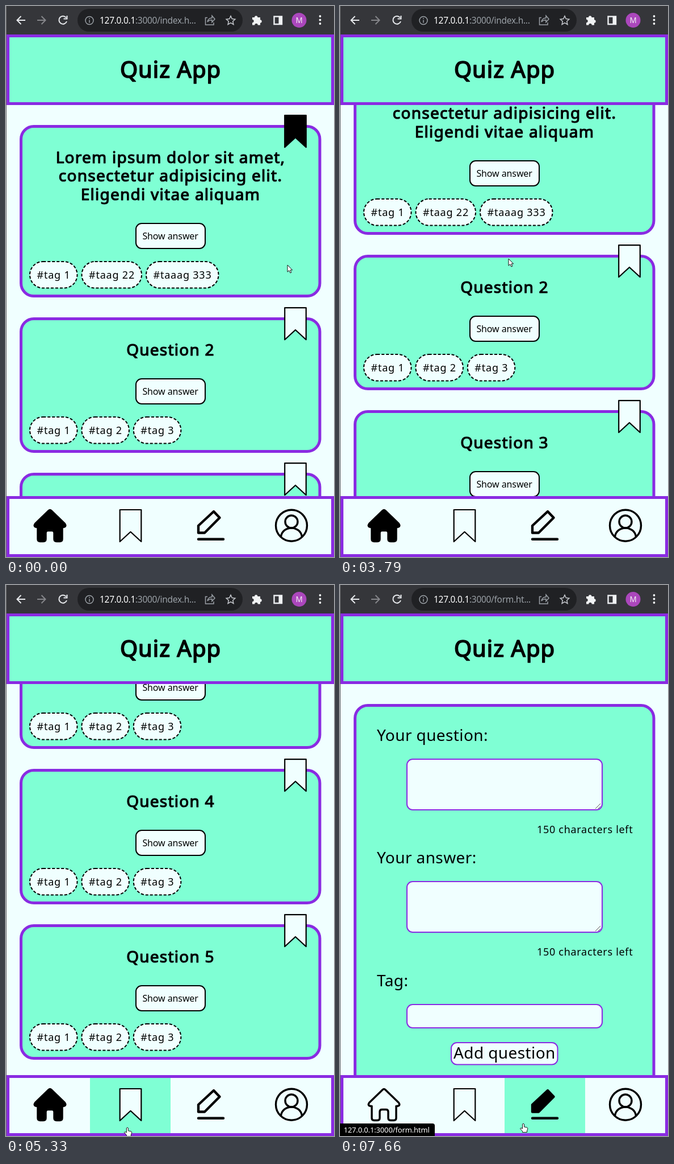
These frames come from a looping animation (578 by 968 pixels, 8000 ms). An HTML page:

```html
<!DOCTYPE html>
<html lang="en">
<head>
<meta charset="utf-8">
<title>Quiz App</title>
<style>
html, body { margin: 0; width: 100%; height: 100%; overflow: hidden; background: #f0ffff; }
svg { display: block; width: 578px; height: 968px; font-family: "Noto Sans", "Open Sans", sans-serif; }
text { white-space: pre; }
.box { fill: #7fffd4; stroke: #8a2be2; stroke-width: 5; }
.bar { fill: #f0ffff; }
.h1, .h2 { text-anchor: middle; stroke: #000; stroke-linejoin: round; }
.h1 { font-size: 40px; stroke-width: 1.7; }
.h2 { font-size: 28px; stroke-width: 1.2; }
.btn rect { fill: #f0ffff; stroke: #000; stroke-width: 2; }
.btn text { font-size: 16px; letter-spacing: -.1px; text-anchor: middle; }
.tag rect { fill: #f0ffff; stroke: #000; stroke-width: 2; stroke-dasharray: 5 3; }
.tag text { font-size: 18px; letter-spacing: .8px; }
.small { font-size: 18px; }
.label { font-size: 28px; letter-spacing: .4px; }
.field { fill: #f0ffff; stroke: #8a2be2; stroke-width: 2; }
.mark { fill: #f0ffff; stroke: #000; stroke-width: 2.2; stroke-linejoin: round; }
.mark.on, .icon.on .fillable { fill: #000; }
.icon { fill: none; stroke: #000; stroke-width: 3.4; stroke-linejoin: round; stroke-linecap: round; }
.pen { stroke-width: 4.4; }
.tool { fill: none; stroke: #e8eaed; stroke-width: 2; }
.url { font-size: 15.5px; letter-spacing: -.3px; fill: #9aa0a6; }
.status { font-size: 13px; letter-spacing: -.15px; fill: #fff; }
.ptr { fill: #fff; stroke: #111; stroke-width: 1; stroke-linejoin: round; }
</style>
</head>
<body>
<svg id="stage" viewBox="0 0 578 968"></svg>
<script>
const LOOP = 8000, PITCH = 273, ANSWER_H = 56.5;
const NAV_X = [6, 148, 290, 432, 573];
const $ = id => document.getElementById(id);

const rect = (x, y, w, h, r, cls = '') =>
  `<rect class="${cls}" x="${x}" y="${y}" width="${w}" height="${h}" rx="${r}"/>`;
const text = (x, y, s, cls, gap) =>
  `<text class="${cls}" x="${x}" y="${y}"${gap ? ` letter-spacing="${gap}"` : ''}>${s}</text>`;
const mark = (x, y, cls) =>
  `<path class="mark ${cls}" d="M${x} ${y}h37.6v56l-18.8-17.2l-18.8 17.2z"/>`;

function button(y, label, id = '') {
  const w = label === 'Hide answer' ? 118 : 124;
  return `<g class="btn" id="${id}">${rect(290 - w / 2 + 1, y + 1, w - 2, 44, 10)}${text(289.6, y + 29, label, '')}</g>`;
}

function tag(x, y, w, s) {
  return `<g class="tag">${rect(x + 1, y + 1, w - 2, 46.5, 23.2)}${text(x + 13.5, y + 30.5, s, '')}</g>`;
}

// A quiz card; everything below the heading is laid out from its line count.
function card(top, lines, tags, { saved = '', answer = '', id = '' } = {}) {
  const extra = (lines.length - 1) * 32.5;
  const btnY = top + 107 + extra;
  const tagY = btnY + 67 + (answer ? ANSWER_H : 0);
  return rect(26.5, top + 2.5, 526.5, tagY + 59 - top, 22.5, 'box')
    + mark(491.2, top - 16.8, saved)
    + lines.map((s, i) => text(290, top + 66.5 + i * 32.5, s, 'h2', 1.25)).join('')
    + button(btnY, answer ? 'Hide answer' : 'Show answer', id)
    + (answer && text(245, btnY + 98, answer, 'small', .4))
    + tags.map(([x, w, s]) => tag(x, tagY, w, s)).join('');
}

const lorem = ['Lorem ipsum dolor sit amet,', 'consectetur adipisicing elit.', 'Eligendi vitae aliquam'];
const loremTags = [[41, 85.5, '#tag 1'], [132.5, 107.5, '#taag 22'], [246, 129.5, '#taaag 333']];
const plainTags = [1, 2, 3].map((n, i) => [41 + i * 91.4, 85.5, '#tag ' + n]);
const first = opts => card(209, lorem, loremTags, { saved: 'on', ...opts });
const rest = [2, 3, 4, 5].map((n, i) => card(547 + i * PITCH, ['Question ' + n], plainTags)).join('');

function area(y) {
  return rect(118, y + 1, 344, 89, 10, 'field')
    + `<path d="M450 ${y + 88}l9-9M455 ${y + 88}l4-4" stroke="#555"/>`
    + text(347, y + 131, '150 characters left', 'small', .7);
}
const form = rect(26.5, 211.5, 526.5, 800, 22.5, 'box')
  + text(65, 274, 'Your question:', 'label') + area(305)
  + text(65, 489, 'Your answer:', 'label') + area(520)
  + text(65, 705, 'Tag:', 'label') + rect(118, 737, 344, 41, 10, 'field')
  + rect(196, 804, 187.5, 38.5, 10, 'field') + text(200, 832, 'Add question', 'label');

const toolbar = `<rect width="578" height="50" fill="#35363a"/>
  <rect x="126" y="5" width="291" height="40" rx="20" fill="#202124"/>
  <g class="tool">
    <path d="M34 25H20M26.5 18l-7 7 7 7"/>
    <path d="M55 25H69M62.5 18l7 7-7 7" stroke="#85868a"/>
    <path d="M106 20.5a7 7 0 1 0 1 6.5M107.5 17v5.5h-6"/>
    <g stroke="#9aa0a6" stroke-width="1.5">
      <circle cx="147" cy="25.5" r="7"/><path d="M147 24.5v5M147 21v1.8"/>
      <path d="M355 20.5h-3.5v12.5h14.5v-4M355 28c1-5 4-7 8-7v-4l5 6-5 5.5v-4c-4 0-6 1-8 3.5z"/>
    </g>
    <path d="M396 17.5l2.3 5.1 5.5.6-4.1 3.7 1.2 5.5-4.9-2.8-4.9 2.8 1.2-5.5-4.1-3.7 5.5-.6z" stroke="#c4c7cc" stroke-width="1.5"/>
    <rect x="472.5" y="18.5" width="13.5" height="13.5" stroke-width="2.5"/>
  </g>
  <g fill="#f1f3f4">
    <path d="M434 20h4a2.7 2.7 0 1 1 5.4 0h4.6v4.3a2.7 2.7 0 1 1 0 5.4v3.8h-4.3a2.7 2.7 0 0 0-5.4 0h-4.3v-4.3a2.7 2.7 0 0 0 0-5.4z"/>
    <rect x="480.5" y="18" width="6" height="14"/>
    ${[18, 24.5, 31].map(y => `<circle cx="553.5" cy="${y}" r="1.9"/>`).join('')}
    <circle cx="516.5" cy="25" r="13" fill="#ab47bc"/>
    <text x="516.5" y="30" font-size="13.5" text-anchor="middle">M</text>
  </g>
  <text class="url" x="165" y="31"><tspan fill="#fff">127.0.0.1</tspan><tspan id="path"></tspan></text>`;

const nav = `<rect x="1" y="861" width="577" height="107" fill="#8a2be2"/>
  ${rect(6, 866, 567, 97, 0, 'bar')}
  <rect id="cell" y="866" width="142" height="97" fill="#7fffd4"/>
  <g class="icon" id="nav0"><path class="fillable" d="M75.3 886.5Q77.5 884.5 79.7 886.5L103.5 909.5Q107 914.5 101 915.5H99V936.5Q99 940.5 95 940.5H89Q85 940.5 85 936.5V925.5Q85 921.5 81 921.5H74Q70 921.5 70 925.5V936.5Q70 940.5 66 940.5H60Q56 940.5 56 936.5V915.5H54Q48 914.5 51.5 909.5Z"/></g>
  <g id="nav1">${mark(200.7, 885, '')}</g>
  <g class="icon pen" id="nav2"><path class="fillable" d="M339 913L366 888L376.5 899L350 925.5H339Z"/><path d="M339 936.7H383"/></g>
  <g class="icon"><circle cx="503" cy="912.7" r="27.5"/><circle cx="503" cy="906" r="11"/><path d="M484.5 932.5C487 912 519 912 521.5 932.5"/></g>`;

$('stage').innerHTML = `<rect width="578" height="968" fill="#f0ffff"/>
  <g id="home"><g id="shut">${first({ id: 'show' })}</g><g id="open">${first({ answer: 'ANSWER 1', id: 'hide' })}</g><g id="rest">${rest}</g></g>
  <g id="saved">${first()}</g>
  <g id="form">${form}</g>
  ${rect(3.5, 52.5, 572, 119, 0, 'box')}
  <text class="h1" id="title" x="290" y="126"></text>
  ${toolbar}${nav}
  <rect width="1" height="968" fill="#6b6c6f"/>
  <g id="status"><path id="bar"/><text class="status" id="link" x="6.5" y="961.5"></text></g>
  <g id="ptr"><path class="ptr" id="arrow" d="M0 0V12.2L2.8 9.6L4.9 14L6.9 13.1L4.9 8.9H8.6Z"/>
  <path class="ptr" id="hand" d="M-1.5 9V1.2Q0-.8 1.5 1.2V6L6.3 7Q8 7.5 7.8 9.5L6.5 13V15.5H-1.5V13.5L-5.5 9Q-4.5 7-3 8.3Z"/></g>`;

const pages = {
  home: { title: 'Quiz App', gap: 1, path: ':3000/index.h...', icon: 0 },
  saved: { title: 'Bookmarks', gap: .2, path: ':3000/bookm...', icon: 1 },
  form: { title: 'Quiz App', gap: 1, path: ':3000/form.ht...', icon: 2 }
};
const links = { 1: ['bookmark.h...', 190], 2: ['form.html', 167] };

// Pointer moves: start, end, step count, then start, bend and end of the path.
const moves = [
  [1360, 2040, 9, [496, 455], [400, 176], [288, 392]],
  [3440, 3440, 1, [288, 392], [292, 420], [297, 444]],
  [4840, 5140, 5, [297, 444], [270, 700], [222, 964]],
  [5330, 5580, 4, [222, 964], [210, 950], [205, 933]],
  [6690, 7100, 7, [205, 933], [264, 930], [323, 946]]
];
const scrolls = [[0, 0], [3790, 110], [3850, 260], [3920, 410], [3980, 540], [4050, 634],
  [4110, 652], [4180, 660], [4470, 701], [4540, 770]];

function pointerAt(t) {
  const m = moves.filter(m => t >= m[0]).pop();
  if (!m) return moves[0][3];
  const [t0, t1, n, a, b, c] = m;
  const step = n > 1 ? Math.min(n, Math.floor((t - t0) / (t1 - t0) * (n - 1) + 1e-6) + 1) : 1;
  const u = Math.sin(step / n * Math.PI / 2), v = 1 - u;
  return [0, 1].map(i => v * v * a[i] + 2 * u * v * b[i] + u * u * c[i]);
}

const show = (id, on) => $(id).setAttribute('display', on ? 'inline' : 'none');
const move = (id, x, y) => $(id).setAttribute('transform', `translate(${x} ${y})`);

function draw(t) {
  const [x, y] = pointerAt(t);
  const name = t < 5880 ? 'home' : t < 7570 ? 'saved' : 'form';
  const page = pages[name];
  const open = t >= 2210 && t < 3070;
  const scroll = scrolls.filter(s => t >= s[0]).pop()[1];

  for (const id in pages) show(id, id === name);
  show('open', open);
  show('shut', !open);
  move('home', 0, -scroll);
  move('rest', 0, open ? ANSWER_H : 0);
  const over = scroll === 0 && x > 228 && x < 352 && y > 381 && y < 427;
  for (const id of ['show', 'hide'])
    $(id).setAttribute('transform', over ? 'translate(290 404) scale(1.1) translate(-290 -404)' : '');

  $('title').textContent = page.title;
  $('title').style.letterSpacing = page.gap + 'px';
  $('path').textContent = t >= 7490 ? pages.form.path : page.path;
  $('nav0').classList.toggle('on', page.icon === 0);
  $('nav1').firstChild.classList.toggle('on', page.icon === 1);
  $('nav2').classList.toggle('on', page.icon === 2);

  const cell = y > 866 && y < 963 ? NAV_X.findIndex((left, i) => x >= left && x < NAV_X[i + 1]) : -1;
  show('cell', cell >= 0);
  if (cell >= 0) $('cell').setAttribute('x', NAV_X[cell]);
  const link = t >= 5750 && links[cell];
  show('status', link);
  if (link) {
    $('link').textContent = '127.0.0.1:3000/' + link[0];
    $('bar').setAttribute('d', `M0 946H${link[1] - 4}q4 0 4 4V968H0Z`);
  }
  move('ptr', x, y);
  show('arrow', cell < 0);
  show('hand', cell >= 0);
}

const start = performance.now();
function tick() {
  draw((performance.now() - start) % LOOP);
  requestAnimationFrame(tick);
}
tick();
</script>
</body>
</html>
```
